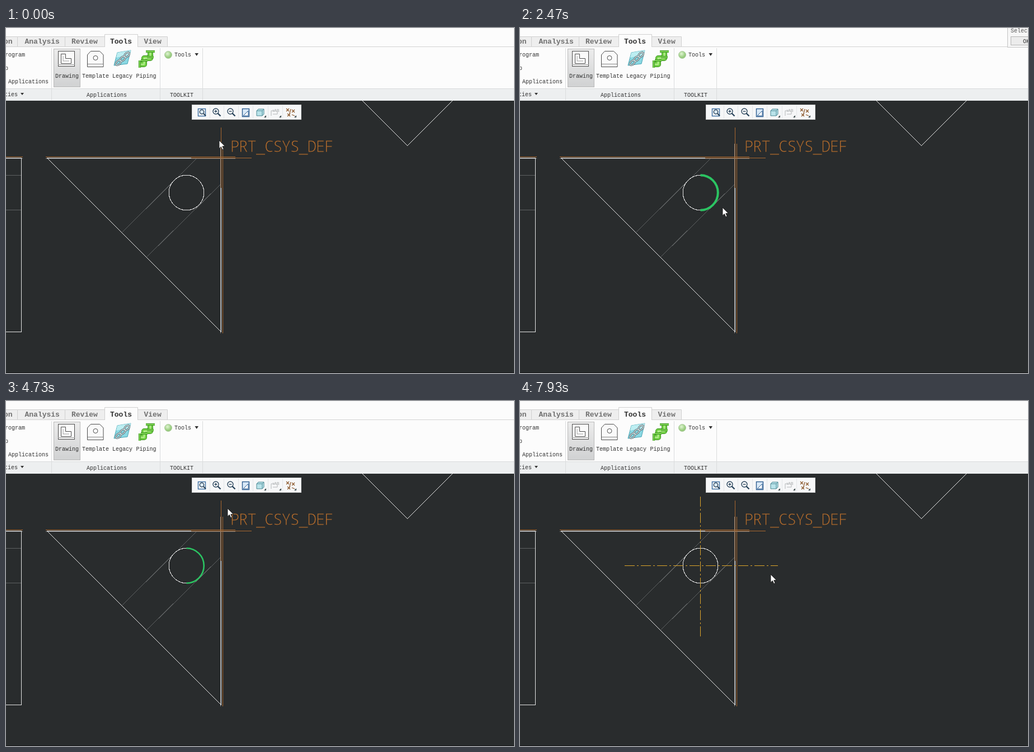
Write an HTML page that moves like this. It is 908 px wide and 617 px high and loops after 8000 ms.

```html
<!DOCTYPE html>
<html lang="en">
<head>
<meta charset="utf-8">
<title>Centre line tool</title>
<style>
html, body { margin: 0; width: 100%; height: 100%; overflow: hidden; background: #292c2d; }
svg { display: block; width: 100vw; height: 100vh; }
text { font: 10px "Liberation Mono", monospace; fill: #303030; white-space: pre; }
.tab { font-size: 13px; font-weight: bold; fill: #707070; }
.cjk { font: 9.5px "Noto Sans CJK SC", "Noto Sans CJK", sans-serif; fill: #111; }
.label { font: 300 28.5px "Noto Sans Mono", monospace; letter-spacing: -1.8px; fill: #b06a2c; stroke: #292c2d; stroke-width: 1; }
.sheet { shape-rendering: crispEdges; }
.white { stroke: #e4e4e4; fill: none; }
.grey { stroke: #5d6061; fill: none; }
.orange { stroke: #a9682f; fill: none; }
.green { stroke: #2bc462; fill: none; }
.centre { stroke: #dca52c; stroke-dasharray: 18 4 3 4; }
</style>
</head>
<body>
<svg viewBox="0 0 908 617" preserveAspectRatio="none">
  <defs>
    <linearGradient id="press" x2="0" y2="1">
      <stop stop-color="#ececec"/><stop offset="1" stop-color="#d0d1d2"/>
    </linearGradient>
    <linearGradient id="down" x2="0" y2="1">
      <stop stop-color="#bdbdbd"/><stop offset="1" stop-color="#c6c6c6"/>
    </linearGradient>
    <radialGradient id="ball" cx=".4" cy=".35">
      <stop stop-color="#e0f6d3"/><stop offset="1" stop-color="#98cb7e"/>
    </radialGradient>
  </defs>

  <!-- Drawing sheet -->
  <rect width="908" height="617" fill="#292c2d"/>
  <path d="M0 616.5H908" stroke="#141616"/>
  <g class="sheet">
    <g class="grey">
      <path d="M0 263.5H27M0 325.5H27"/>
      <path d="M339.500 234.500L207.500 365.500M384.500 278.500L251.500 409.500"/>
      <path d="M0 233.500H30M71 233.500H410M383.500 207V546" stroke="#858585"/>
    </g>
    <path class="orange" d="M0 230.500H30M71 230.500H410M331 232.500H439M384.500 178V286M387.500 207V546"/>
    <g class="white">
      <path d="M0 232.500H27.500V543.500H0"/>
      <path d="M331 232.500H73.500L384.500 543.500V286"/>
      <path d="M636.500 129.500L717.500 210.500L798.500 129.500"/>
      <circle cx="322.500" cy="294.500" r="31.300"/>
    </g>
    <path id="edge" class="green" d="M73 233H331" stroke-width="3"/>
    <path id="ticks" d="M322.500 230V236M382 291.500H388" stroke="#202323" stroke-width="2"/>
    <path id="across" class="centre"/>
    <path id="upright" class="centre"/>
  </g>
  <text class="label" x="400.500" y="221.500">PRT_CSYS_DEF</text>
  <path id="arc" class="green" d="M322.500 263.200A31.300 31.300 0 0 1 322.500 325.800"/>

  <!-- Ribbon -->
  <rect width="908" height="130" fill="#fcfcfc"/>
  <rect y="109" width="908" height="21" fill="#edeff0"/>
  <path d="M0 108.500H908" stroke="#d9dbdc"/>
  <g id="tabs"></g>
  <path d="M0 33.500H176M235 33.500H908" stroke="#d2d2d2"/>
  <path d="M81.500 36V129M275.500 36V129M351.500 36V129" stroke="#dadcdd"/>
  <rect x="85.500" y="37.500" width="47" height="68" fill="url(#press)" stroke="#b9b9b9"/>
  <g id="words"></g>
  <path d="M26 116h6l-3 4z" fill="#333"/>

  <g fill="#fafafa" stroke="#4c4c4c">
    <rect x="93.500" y="41.500" width="29" height="27"/>
    <path d="M98.500 46.500h8v8h10v9h-18z" fill="#fff"/>
    <path d="M102 50v9h11M93 65.500h30" fill="none" stroke="#999"/>
    <path d="M145.500 69.500V48l6-6.500h16l6.500 6.500v21.500z"/>
    <path d="M146 64.500h28" stroke="#888"/>
    <circle cx="160" cy="53.500" r="4"/>
  </g>
  <g fill="none" stroke-linejoin="round">
    <path d="M193 67L199 44L223 40L217 64z" fill="#8ad8e3" stroke="#4aa5b5"/>
    <path d="M199 44L223 40L221 48L197 53z" fill="#bdeef2"/>
    <g id="chain"></g>
    <g id="pipe"></g>
  </g>

  <!-- Tools button -->
  <rect id="button" x="278.500" y="37.500" width="69" height="21" stroke="#b9b9b9"/>
  <circle cx="290" cy="48" r="6.500" fill="url(#ball)" stroke="#a3c296" stroke-width=".7"/>
  <text x="301" y="51">Tools</text>
  <path d="M337.500 45h6.500l-3.250 5z" fill="#333"/>

  <!-- View toolbar -->
  <rect x="332.500" y="137.500" width="195" height="26" fill="#f6f7f8" stroke="#d3d6d7"/>
  <path d="M364.500 139v23M389.500 139v23M415.500 139v23M441.500 139v23M468.500 139v23M494.500 139v23" stroke="#e3e6e8"/>
  <g fill="none" stroke="#2a455c" stroke-width="1.400">
    <rect x="343.500" y="144.500" width="13" height="13" stroke="#3b6ea2"/>
    <circle cx="350" cy="150" r="3.700" fill="#dceaf5"/><path d="M353 153l4 4" stroke-width="2.200"/>
    <circle cx="375" cy="149" r="5" fill="#fff"/><path d="M378.500 152.500l5 5" stroke-width="2.400"/>
    <path d="M372.500 149h5M375 146.500v5"/>
    <circle cx="401" cy="149" r="5" fill="#fff"/><path d="M404.500 152.500l5 5" stroke-width="2.400"/>
    <path d="M398.500 149h5"/>
    <rect x="422.500" y="144.500" width="12" height="14" fill="#d9e9f7" stroke="#2d5d90"/>
    <path d="M424 157l9-9v9z" fill="#fff" stroke="#2d5d90" stroke-width="1"/>
    <path d="M448 148l3-3h10v9l-3 3h-10z" fill="#b9e3ea" stroke="#4d8994" stroke-width="1"/>
    <path d="M448 148h10v9M458 148l3-3" stroke="#4d8994" stroke-width="1"/>
    <path d="M474 157v-9h5l-2-2m2 2l-2 2M477 154h8v-4" stroke="#b3b6b8" stroke-width="1"/>
    <path d="M501 144l5 5m0-5l-5 5M511 146l5 5m0-5l-5 5M503 153l5 5m0-5l-5 5M509 145l-3 12M511 155l5 2" stroke="#8a5527" stroke-width="1.200"/>
  </g>
  <text x="479" y="150" style="font-size:8px;fill:#a4a7a9">AB</text>
  <path d="M465 160v-4l-4 4zM492 160v-4l-4 4zM519 160v-4l-4 4z" fill="#3c4b4d"/>

  <!-- Menus -->
  <g id="menu">
    <rect x="278.500" y="59.500" width="84" height="37" fill="#fdfdfd" stroke="#b6b6b6"/>
    <rect id="item" x="279" y="69" width="83" height="19" fill="#aee2fc"/>
    <text class="cjk" x="303.500" y="82">辅助线</text>
    <path d="M345.500 75l5.500 4l-5.500 4z" fill="#222"/>
  </g>
  <rect id="submenu" x="361.500" y="63.500" width="82" height="37" fill="#fdfdfd" stroke="#b6b6b6"/>
  <g id="choice">
    <rect id="chosen" x="361" y="73" width="83" height="19" fill="#aee2fc"/>
    <text class="cjk" x="385" y="86">中心线</text>
  </g>

  <g id="dialog">
    <rect x="871.500" y="-2.500" width="60" height="37" fill="#f6f6f6" stroke="#c4c4c4"/>
    <text x="877" y="8" style="fill:#555">Select</text>
    <rect x="877.500" y="15.500" width="50" height="15" fill="#ececec" stroke="#b4b4b4"/>
    <text x="899" y="27">OK</text>
  </g>

  <path id="cursor" d="M0 0V14.500L3.400 11.400L5.800 16.700L8.100 15.700L5.800 10.600H10.400Z"
    fill="#fff" stroke="#1a1a1a" stroke-width=".9"/>
</svg>
<script>
const LOOP = 8000, CX = 323.5, CY = 295.5;
const FIX = 7400, HALF = [137, 125];
const $ = id => document.getElementById(id);

const tabs = [[-20, 20, -4, 'on'], [20, 105, 33.5, 'Analysis'], [105, 176, 117, 'Review'],
  [235, 288, 246.5, 'View'], [176, 235, 186, 'Tools']];
$('tabs').innerHTML = tabs.map(([l, r, x, s]) => {
  const on = s === 'Tools', top = on ? 11.5 : 15.5;
  return `<path d="M${l + .5} 34V${top}H${r + .5}V34" fill="${on ? '#fcfcfc' : '#eeeeee'}" stroke="#d0d0d0"/>
    <text class="tab" x="${x}" y="28" ${on ? 'style="fill:#333"' : ''}>${s}</text>`;
}).join('');

const words = [[-2, 51, 'rogram'], [-2, 75, 'p'], [4, 99, 'Applications'], [-3, 122, 'ties'],
  [88, 89, 'Drawing'], [136, 89, 'Template'], [190, 89, 'Legacy'], [232.5, 89, 'Piping'],
  [144, 123, 'Applications'], [293, 123, 'TOOLKIT']];
$('words').innerHTML = words.map(([x, y, s]) => `<text x="${x}" y="${y}">${s}</text>`).join('');

// Dark outline first, lighter core on top
const layers = (shape, list) =>
  list.map(([color, width]) => `<g stroke="${color}" stroke-width="${width}">${shape}</g>`).join('');
const links = [0, 1, 2].map(i =>
  `<ellipse rx="5.5" ry="3.2" transform="translate(${201 + 7.5 * i} ${62 - 7 * i}) rotate(-42)"/>`).join('');
$('chain').innerHTML = layers(links, [['#55696f', 3], ['#e3eef0', 1.3]]);
$('pipe').innerHTML = layers('<path d="M258 41V54H247V65H237"/>', [['#3f9324', 10], ['#6fcf42', 8], ['#b4ee8c', 2.5]])
  + layers('<path d="M250 42H266M239 58V71M252 52H264M241 58H253"/>', [['#3f9324', 4], ['#7fd654', 2]]);

// Pointer stops: time, x, y
const stops = [
  [0, 381, 201], [50, 381, 201], [730, 302, 53], [1000, 302, 53], [1330, 258, 72],
  [1470, 258, 72], [1930, 398, 85], [2120, 398, 85], [2450, 362, 322], [2670, 355, 297],
  [3270, 355, 297], [3870, 391, 379], [3930, 391, 379], [4250, 458, 385], [4730, 396, 192],
  [4790, 396, 192], [5600, 440, 394], [5670, 442, 401], [5720, 442, 401], [6000, 462, 403],
  [6470, 462, 403], [6800, 464, 417], [7200, 464, 417], [FIX, 460, 419], [7930, 448, 310],
  [LOOP, 448, 310]
];

function pointer(t) {
  const i = Math.max(1, stops.findIndex(s => s[0] > t));
  const [t0, x0, y0] = stops[i - 1], [t1, x1, y1] = stops[i];
  const p = (t - t0) / (t1 - t0), e = p * p * (3 - 2 * p);
  return [x0 + (x1 - x0) * e, y0 + (y1 - y0) * e];
}

function draw(t) {
  const [x, y] = pointer(t);
  const within = (a, b) => t >= a && t < b;
  const show = (id, on) => $(id).setAttribute('visibility', on ? 'visible' : 'hidden');
  $('cursor').setAttribute('transform', `translate(${Math.round(x)} ${Math.round(y)})`);

  const pressed = within(1130, 2140);
  show('button', within(660, 2140));
  $('button').setAttribute('fill', pressed ? 'url(#down)' : '#fdfdfd');
  show('menu', within(870, 2070));
  show('item', within(1540, 2070));
  show('submenu', within(1670, 2070));
  show('choice', within(1670, 2140));
  show('chosen', within(1800, 2140));

  const fade = t < 3070 ? 1 : Math.max(0, 1 - (t - 3070) / 240);
  $('dialog').setAttribute('opacity', within(2200, 3330) ? fade : 0);

  show('edge', within(2270, 2370));
  show('arc', within(2400, FIX));
  $('arc').setAttribute('stroke-width', t < 3400 ? 4 : 2.6);
  show('ticks', within(3200, 3340));

  // Preview follows the pointer; it drops out when the sheet is redrawn
  const lines = t >= 3400 && !within(4700, 4800) && !within(5640, 5730);
  const [hx, hy] = t < FIX ? [Math.abs(x - CX), Math.abs(y - CY)] : HALF;
  show('across', lines);
  show('upright', lines);
  $('across').setAttribute('d', `M${CX - hx} 294.5H${CX + hx}`);
  $('upright').setAttribute('d', `M322.5 ${CY + hy}V${CY - hy}`);
}

const start = performance.now();
function tick() {
  draw((performance.now() - start) % LOOP);
  requestAnimationFrame(tick);
}
tick();
</script>
</body>
</html>
```
